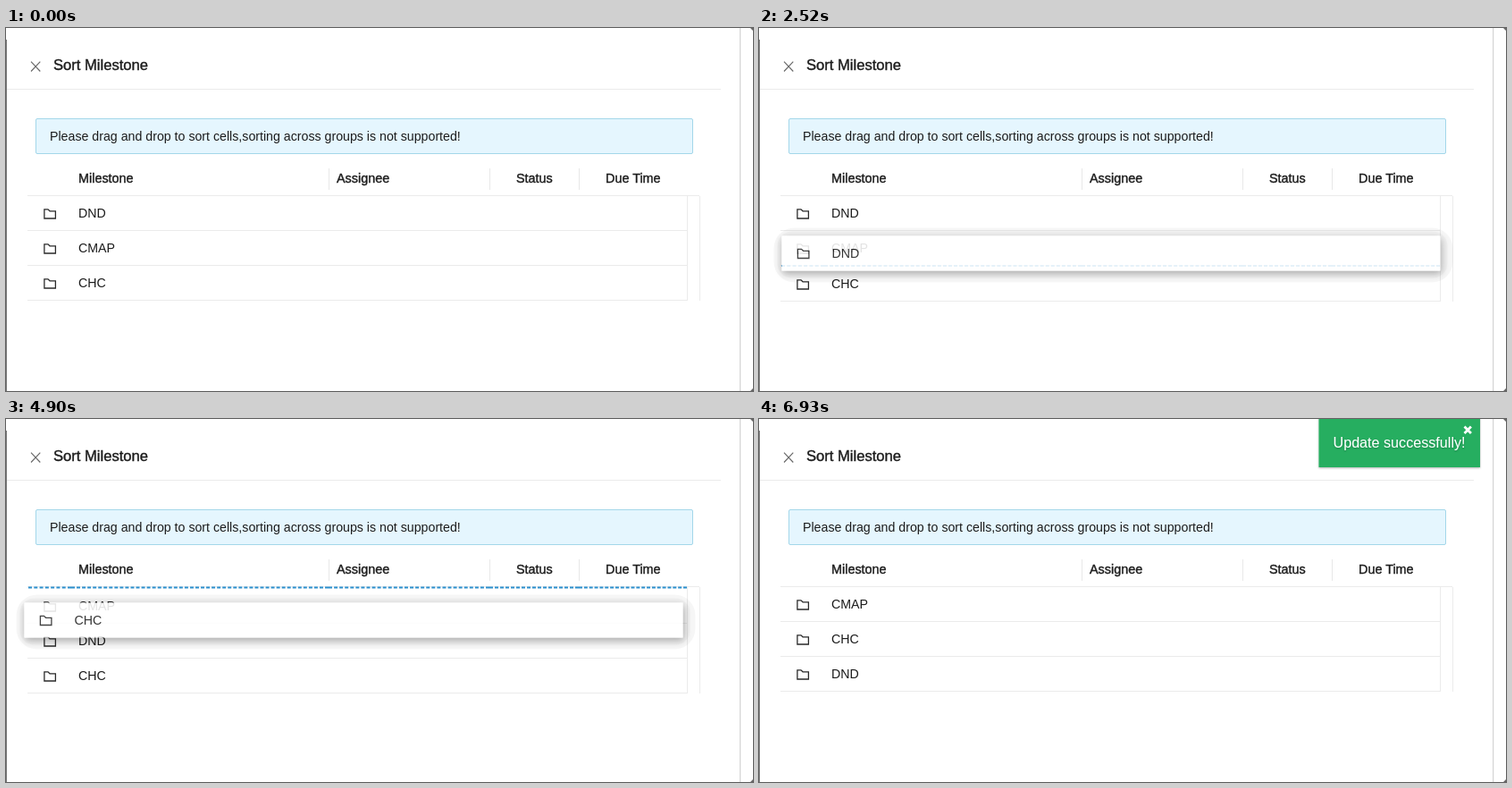
Animation, 836 px wide and 406 px high, one loop 7070 ms. Source, as an HTML page:

```html
<!DOCTYPE html>
<html lang="en">
<head>
<meta charset="utf-8">
<title>Sort Milestone</title>
<style>
  html, body { margin: 0; width: 100%; height: 100%; overflow: hidden; background: #fff; }
  svg { display: block; width: 836px; height: 406px; }
  text { font: 14.2px "Liberation Sans", Arial, sans-serif; fill: #1c1c1c; }
  .medium { font-size: 14.4px; stroke: #1c1c1c; stroke-width: .4px; }
  .title { font-size: 16.6px; }
  .rule { fill: #ebebeb; }
  .icon { fill: none; stroke: #2a2a2a; stroke-width: 1.3; }
  .toast { font-size: 16.15px; fill: #fff; }
</style>
</head>
<body>
<svg viewBox="0 0 836 406">
  <defs>
    <filter id="soft" x="-5%" y="-60%" width="110%" height="220%"><feGaussianBlur stdDeviation="4"/></filter>
    <filter id="glow" x="-5%" y="-20%" width="110%" height="140%">
      <feDropShadow dx="0" dy="1" stdDeviation="1.2" flood-color="#000" flood-opacity=".3"/>
    </filter>
    <clipPath id="outside"><path clip-rule="evenodd" d="M-30 -30H790V80H-30ZM0 0V39H737V0Z"/></clipPath>
    <g id="folder"><path class="icon" d="M17.9 14.9h4.1l2 1.9h6.4v8.2h-12.5z"/></g>
  </defs>

  <rect width="836" height="406" fill="#fff"/>
  <rect y="13" width="1" height="393" fill="#777"/>
  <rect x="821" width="1.3" height="406" fill="#d6d6d6"/>
  <path d="M833 0h3v3zM836 403v3h-3z" fill="#666"/>

  <path d="M28 37.7l10.3 10.8M38.3 37.7L28 48.5" fill="none" stroke="#666" stroke-width="1.1"/>
  <text class="medium title" x="53" y="47">Sort Milestone</text>
  <rect class="rule" x="1" y="68" width="799" height="1"/>

  <rect x="33.5" y="101.5" width="735" height="39" rx="1.5" fill="#e5f6fe" stroke="#a3d7ea"/>
  <text x="49" y="126">Please drag and drop to sort cells,sorting across groups is not supported!</text>

  <text class="medium" x="81" y="173">Milestone</text>
  <text class="medium" x="370" y="173">Assignee</text>
  <text class="medium" x="571" y="173">Status</text>
  <text class="medium" x="671" y="173">Due Time</text>
  <path d="M361.5 157v24M541.5 157v24M641.5 157v24" stroke="#e8e8e8"/>
  <rect class="rule" x="24" y="187" width="752" height="1"/>

  <g id="rows"></g>
  <rect id="side1" class="rule" x="762" y="188" width="1" height="117"/>
  <rect id="side2" class="rule" x="776" y="188" width="1" height="117"/>
  <g id="dash" fill="none" stroke="#2b8fce" stroke-width="2"></g>

  <g id="ghost">
    <g clip-path="url(#outside)">
      <rect x="-9" y="-9" width="760" height="61" rx="23" opacity=".035"/>
      <rect x="-5" y="-5" width="750" height="52" rx="16" opacity=".025"/>
      <rect x="1" y="3" width="737" height="39" rx="3" opacity=".3" filter="url(#soft)"/>
    </g>
    <g id="card">
      <rect width="737" height="39" fill="#fff"/>
      <use href="#folder"/>
      <text id="cardName" x="56" y="24"></text>
    </g>
  </g>

  <g id="toast">
    <rect x="0" y="-2" width="180.5" height="56" fill="#27ae60" filter="url(#glow)"/>
    <text class="toast" x="16" y="31.5" filter="url(#glow)">Update successfully!</text>
    <path d="M163 8.5l7.4 7.4M170.4 8.5L163 15.9" stroke="#fff" stroke-width="2.8" fill="none"/>
  </g>
</svg>
<script>
const LOOP = 7070, STEP = 70;
const LEFT = 25, TOP = 188, ROW = 39, GRAB = 20;
const COLUMNS = [25, 73, 361, 541, 641, 762];
const $ = id => document.getElementById(id);
const put = (el, attrs) => { for (const k in attrs) el.setAttribute(k, attrs[k]); };
const show = (el, on) => put(el, { visibility: on ? 'visible' : 'hidden' });
const clamp = v => Math.min(1, Math.max(0, v));
const mix = (a, b, u) => a + (b - a) * u;
const easeOut = u => 1 - (1 - u) ** 3;

$('rows').innerHTML = '<g><use href="#folder"/><text x="56" y="24"></text><rect class="rule" x="-1" y="38" width="738" height="1"/></g>'.repeat(3);
const rows = [...$('rows').children];

// Dashes of 4 px per cell, with the gap fitted so each cell ends on a dash.
$('dash').innerHTML = COLUMNS.slice(1).map((end, i) => {
  const length = end - COLUMNS[i];
  const count = Math.round((length + 2) / 6);
  const gap = (length - 4 * count) / (count - 1);
  return `<path d="M${COLUMNS[i]} 0h${length}" stroke-dasharray="4 ${gap}"/>`;
}).join('');

const drags = [
  { from: 0, start: 2100, end: 2940, path: [[2100, 0, 12], [2520, .5, 44.5]] },
  { from: 2, start: 4550, end: 5670,
    path: [[4550, -2, -17], [4900, -4.5, -60.5], [5040, -4.5, -60.5], [5110, -4, -59.5], [5180, -4, -59.5], [5460, -2, -50]] }
];

function along(path, t) {
  let i = 0;
  while (i < path.length - 2 && t >= path[i + 1][0]) i++;
  const [a, b] = [path[i], path[i + 1]];
  const u = clamp((t - a[0]) / (b[0] - a[0]));
  const e = 1 - (1 - u) ** 1.5;
  return [mix(a[1], b[1], e), mix(a[2], b[2], e)];
}

function orderAt(t) {
  if (t < 2940) return ['DND', 'CMAP', 'CHC'];
  return t < 5670 ? ['CMAP', 'DND', 'CHC'] : ['CMAP', 'CHC', 'DND'];
}

// Bounce in from the right over one second.
function toastShift(t) {
  const keys = [[0, 3000], [.6, -25], [.75, 10], [.9, -5], [1, 0]];
  const p = clamp((t - 5536) / 1000);
  let i = 0;
  while (i < 3 && p >= keys[i + 1][0]) i++;
  const [[p0, x0], [p1, x1]] = [keys[i], keys[i + 1]];
  return mix(x0, x1, easeOut((p - p0) / (p1 - p0)));
}

function render(time) {
  const t = Math.floor(time / STEP) * STEP;
  const order = orderAt(t);
  const drag = drags.find(d => t >= d.start && t < d.end);
  let over = -1, up = false;

  show($('ghost'), !!drag);
  if (drag) {
    const [dx, dy] = along(drag.path, t);
    put($('ghost'), { transform: `translate(${LEFT + dx} ${TOP + drag.from * ROW + dy})` });
    put($('card'), { opacity: t - drag.start < STEP ? .82 : .88 });
    $('cardName').textContent = order[drag.from];
    const hover = Math.floor((drag.from * ROW + dy + GRAB - (dy < 0 ? 1 : 0)) / ROW);
    if (hover !== drag.from) {
      over = hover;
      up = hover < drag.from;
    }
  }

  // The dashed border pushes the rows after it down.
  let y = TOP;
  show($('dash'), over >= 0);
  rows.forEach((row, i) => {
    if (i === over && up) {
      put($('dash'), { transform: `translate(0 ${y + .5})` });
      y += 2;
    }
    put(row, { transform: `translate(${LEFT} ${y})` });
    row.children[1].textContent = order[i];
    y += ROW;
    if (i === over && !up) {
      put($('dash'), { transform: `translate(0 ${y})` });
      y += 1;
    }
  });
  put($('side1'), { height: y - TOP });
  put($('side2'), { height: y - TOP });

  show($('toast'), t >= 5536);
  put($('toast'), { transform: `translate(${626.5 + toastShift(t)} 0)` });
}

const origin = performance.now();
function tick() {
  render((performance.now() - origin) % LOOP);
  requestAnimationFrame(tick);
}
tick();
</script>
</body>
</html>
```
